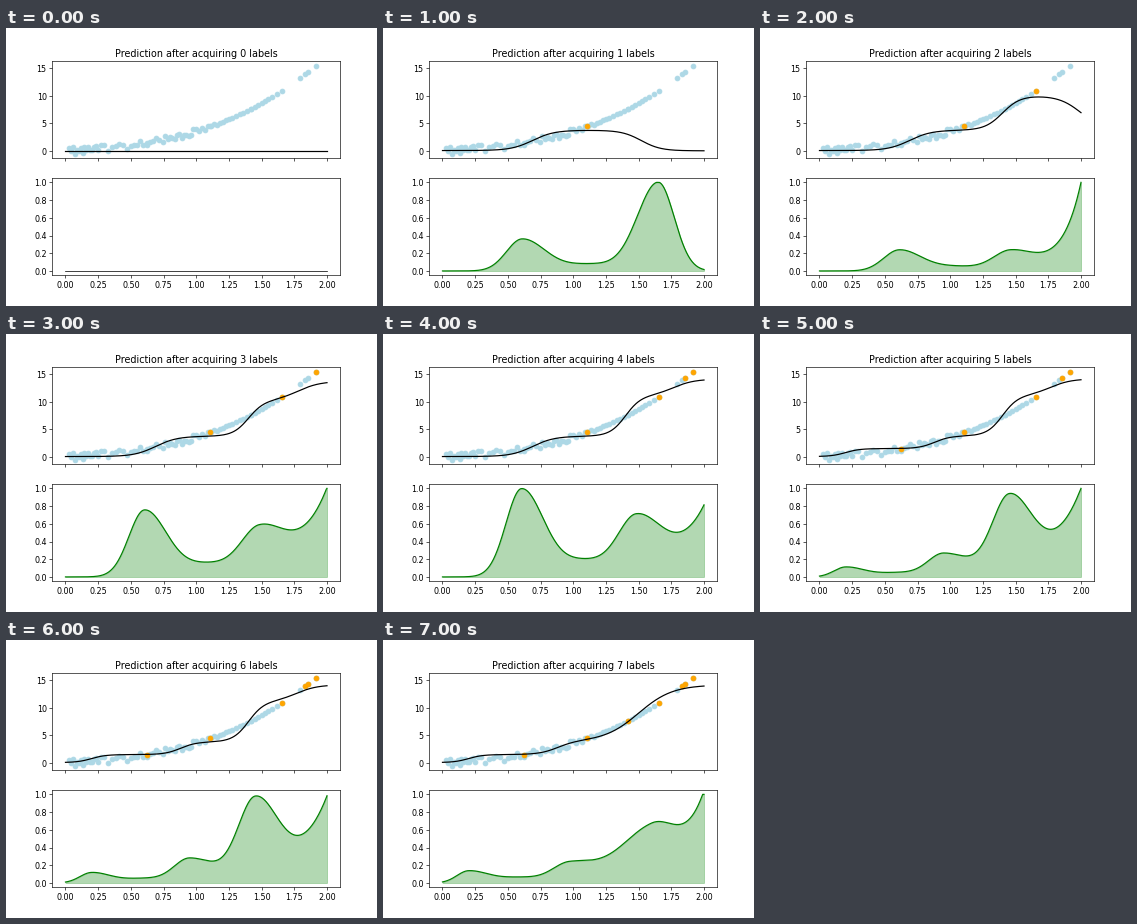
Write a matplotlib script that moves like this. It is 371 px wide and 278 px high and loops after 8000 ms.

```python
import numpy as np
import matplotlib.pyplot as plt
from matplotlib.animation import FuncAnimation

plt.rcParams["font.family"] = "DejaVu Sans"

X = np.linspace(0, 2, 401)


def step(x, height, centre, width):
    """Smooth step of the given height."""
    return height / (1 + np.exp((centre - x) / width))


def bump(x, height, centre, left, right):
    """Bell curve with a separate width on each side."""
    width = np.where(x < centre, left, right)
    return height * np.exp(-((x - centre) / width) ** 2 / 2)


def mean(*steps):
    return .04 + sum(step(X, *s) for s in steps)


def score(bumps, end=0, tau=1, scale=1):
    """Bumps plus an exponential climb to `end` at the right edge."""
    total = scale * sum(bump(X, *b) for b in bumps)
    return np.clip(total + end * np.exp((X - 2) / tau), 0, 1)


# Predicted means, one per number of labels
rise = (3.7, .69, .083)
climb = [(7.4, 1.4, .06), (3.0, 1.77, .08)]
start = (1.45, .2, .055)
five = mean(start, (2.3, .88, .06), *climb)
means = [
    0 * X,
    mean(rise, (-3.75, 1.52, .075)),
    mean(rise, (6.3, 1.4, .068), (-6.2, 2, .085)),
    mean(rise, (6.5, 1.4, .06), (3.5, 1.78, .085)),
    mean(rise, *climb),
    five,
    five,
    mean(start, (2.4, .88, .07), (10.3, 1.5, .13)),
]

# Acquisition scores, one per number of labels
two_humps = [(.75, .605, .12, .17), (.12, 1.08, .18, .18),
             (.455, 1.48, .14, .19)]
three_humps = [(.11, .2, .09, .14), (.045, .6, .17, .17),
               (.25, .95, .12, .2), (.82, 1.45, .13, .17)]
scores = [
    0 * X,
    score([(.36, .61, .121, .175), (.075, 1.13, .2, .2),
           (1, 1.65, .16, .122)]),
    score([(.235, .61, .12, .165), (.05, 1.05, .2, .2),
           (.21, 1.46, .13, .18)], 1, .145),
    score(two_humps, 1, .25),
    score(two_humps, .8, .25, 1.32),
    score(three_humps, 1, .25),
    score(three_humps, .98, .25, 1.05),
    score([(.135, .2, .09, .15), (.06, .6, .17, .17),
           (.21, .97, .13, .2), (.54, 1.6, .25, .18)], 1, .2),
]


def trend(x):
    return x + 1.38 * x**2 + 1.21 * x**3


# Samples get sparser towards the right; the noise dies out there
rng = np.random.default_rng(4)
pool_x = np.interp(np.linspace(0, 1, 74),
                   [0, .21, .33, .47, .66, .81, .93, .985, 1],
                   [.03, .25, .5, .75, 1, 1.25, 1.5, 1.6, 1.795])
noise = .42 - step(pool_x, .4, 1.08, .06)
pool_y = trend(pool_x) + noise * rng.uniform(-1.7, 1.5, pool_x.size)

# Samples in the order they are labelled
query_x = np.array([1.105, 1.655, 1.917, 1.856, .625, 1.832, 1.415])
queries = np.column_stack([query_x, trend(query_x)])

fig, (top, low) = plt.subplots(2, 1, sharex=True, figsize=(6.4, 4.8), dpi=58)
top.set(xlim=(-.1, 2.1), ylim=(-1.4, 16.35))
low.set_ylim(-.05, 1.05)
title = top.set_title("Prediction after acquiring 0 labels")

top.scatter(pool_x, pool_y, color="lightblue")
top.scatter(*queries.T, color="lightblue")
labelled = top.scatter([], [], color="orange")
mean_line, = top.plot(X, means[0], color="black")
score_line, = low.plot(X, scores[0], color="green")
area = low.fill_between(X, scores[0], color="green", alpha=.3)


def update(count):
    title.set_text(f"Prediction after acquiring {count} labels")
    labelled.set_offsets(queries[:count])
    mean_line.set_ydata(means[count])

    score_line.set_ydata(scores[count])
    score_line.set_color("green" if count else "black")
    score_line.set_linewidth(1.5 if count else .9)
    outline = np.column_stack([X, scores[count]])
    area.set_verts([np.vstack([[0, 0], outline, [2, 0]])])
    area.set_visible(count > 0)
    return title, labelled, mean_line, score_line, area


anim = FuncAnimation(fig, update, frames=8, interval=1000, repeat=True)
plt.show()
```
